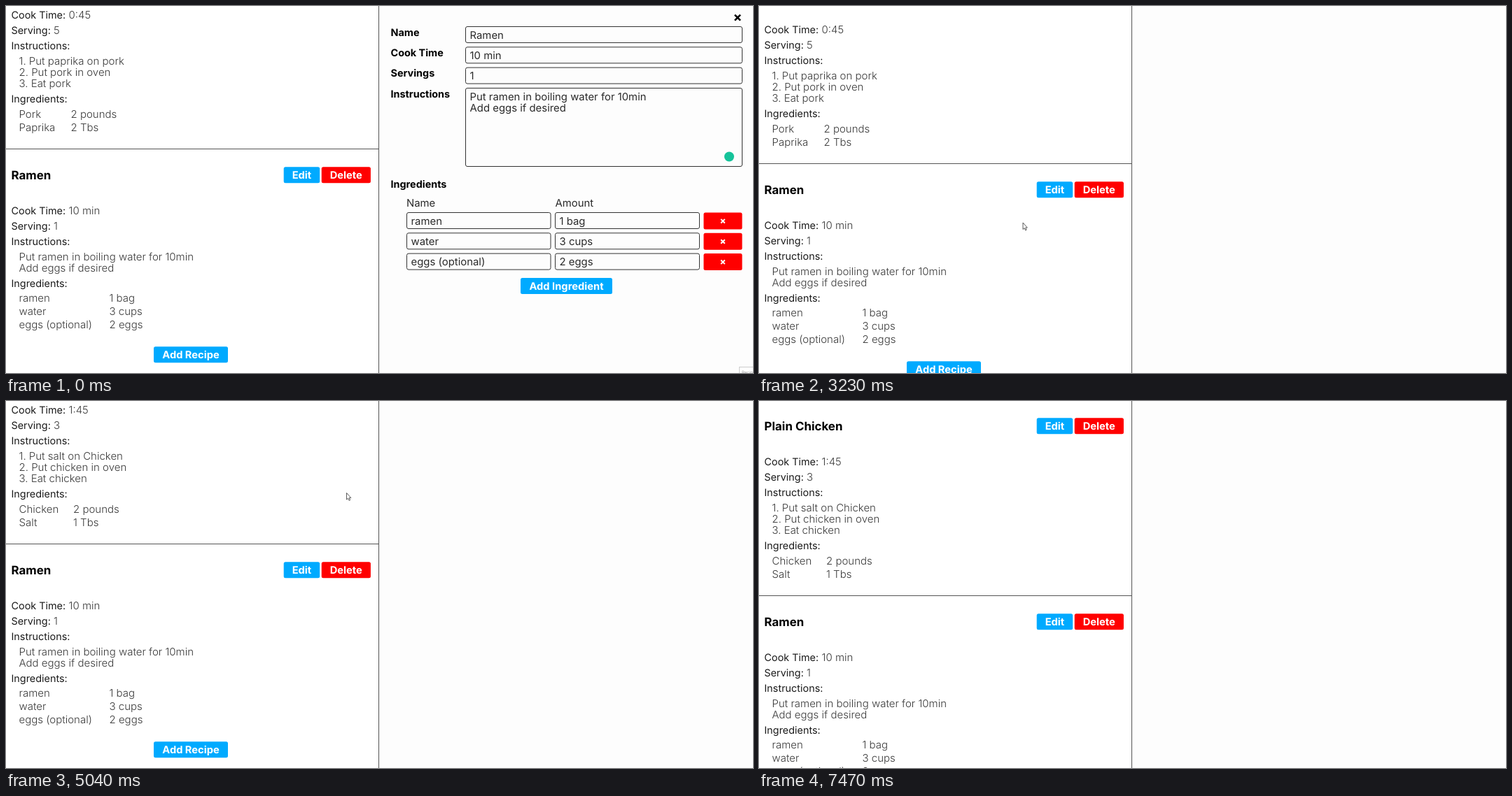
Animation of 1067 by 525 pixels, one loop 8 s. Source, as an HTML page:

```html
<!DOCTYPE html>
<html lang="en">
<head>
<meta charset="utf-8">
<title>Recipe list</title>
<style>
  html, body { margin: 0; width: 100%; height: 100%; overflow: hidden; background: #fff; }
  svg { display: block; width: 100vw; height: 100vh; cursor: default; user-select: none; }
  text { font-family: Inter, "Open Sans", sans-serif; font-size: 14.4px; fill: #1a1a1a; text-rendering: geometricPrecision; }
  .value { font-size: 15px; font-weight: 300; fill: #3a3a3a; }
  .entry { font-size: 14.9px; fill: #2a2a2a; }
  .title { font-size: 16.9px; font-weight: 700; fill: #000; }
  .label { font-size: 14.4px; font-weight: 700; fill: #000; }
  .btn text { font-size: 14.7px; font-weight: 700; fill: #fff; text-anchor: middle; }
  .tip { font-size: 6px; fill: #999; }
  .blue { fill: #0af; }
  .red { fill: #f00; }
  .hot .blue { fill: #0088cc; }
  .hot .red { fill: #c00; }
  .pane { fill: #fdfdfd; }
  .field { fill: #fdfdfd; stroke: #333; }
  .rule { stroke: #555; }
  #cursor { pointer-events: none; }
</style>
</head>
<body>
<svg id="stage" viewBox="0 0 1067 525" preserveAspectRatio="none">
  <g id="list"></g>
  <rect class="pane" x="533" y="0" width="534" height="525"/>
  <path class="rule" d="M532.5 0V525"/>
  <g id="form"></g>
  <g id="tooltip">
    <rect x="1047.5" y="516.5" width="24" height="14" fill="#fff" stroke="#ccc"/>
    <text class="tip" x="1051" y="525.5">Recipe</text>
  </g>
  <g id="cursor">
    <path id="arrow" d="M.5 .5V10L2.6 8.2L4.1 11.4L5.6 10.7L4.2 7.6H6.8Z" fill="#fff" stroke="#333" stroke-width=".8"/>
    <path id="beam" d="M-2 -4.5H-.5L0 -4L.5 -4.5H2M0 -4V4M-2 4.5H-.5L0 4L.5 4.5H2" fill="none" stroke="#555" stroke-width=".8"/>
    <path id="hand" d="M-1 0Q0 -1 1 0V4L4.5 5Q5.5 5.5 5.2 7L4.3 11H-1.2L-4 7Q-4 5.6 -2.6 6.2L-1 7.5Z" fill="#fff" stroke="#333" stroke-width=".8"/>
  </g>
</svg>
<script>
const LOOP = 8000, FORM_CLOSED = 2130, PORK_DELETED = 4970, RECIPE_HEIGHT = 280;
const $ = id => document.getElementById(id);

const text = (cls, x, y, s) => `<text class="${cls}" x="${x}" y="${y}">${s}</text>`;
const rect = (cls, x, y, w, h) =>
  `<rect class="${cls}" x="${x}" y="${y}" width="${w}" height="${h}" rx="2.5"/>`;
const cross = (x, y, r, color, width) =>
  `<path d="M${x - r} ${y - r}l${2 * r} ${2 * r}m0 ${-2 * r}l${-2 * r} ${2 * r}" stroke="${color}" stroke-width="${width}"/>`;
const button = (cls, x, y, w, s) =>
  `<g class="btn">${rect(cls, x, y, w, 23)}<text x="${x + w / 2}" y="${y + 16.7}">${s}</text></g>`;
const field = (x, y, w, s, h = 23) =>
  rect("field", x + .5, y, w - 1, h) + text("entry", x + 6.5, y + 17, s);

// Everything is placed relative to the rule above the recipe.
function recipe(id, name, time, serving, steps, amountX, items) {
  const listY = 159, itemsY = listY + steps.length * 16.4 + 5.5;
  return `<g id="${id}"><path class="rule" d="M0 0H532"/>` +
    text("title", 7.5, 43.6, name) +
    button("blue", 396.7, 25.8, 51.5, "Edit") + button("red", 450.7, 25.8, 70.2, "Delete") +
    text("", 7.5, 93.7, "Cook Time:") + text("value", 89.5, 93.7, time) +
    text("", 7.5, 115.7, "Serving:") + text("value", 68, 115.7, serving) +
    text("", 7.5, 137.5, "Instructions:") +
    steps.map((s, i) => text("value", 18.5, listY + i * 16.4, s)).join("") +
    text("", 7.5, itemsY, "Ingredients:") +
    items.map(([item, amount], i) => {
      const y = itemsY + 21.3 + i * 19.1;
      return text("value", 18.5, y, item) + text("value", amountX, y, amount);
    }).join("") + `</g>`;
}

const noodles = [["ramen", "1 bag"], ["water", "3 cups"], ["eggs (optional)", "2 eggs"]];
const method = ["Put ramen in boiling water for 10min", "Add eggs if desired"];

$("list").innerHTML =
  recipe("chicken", "Plain Chicken", "1:45", 3,
    ["1. Put salt on Chicken", "2. Put chicken in oven", "3. Eat chicken"],
    96, [["Chicken", "2 pounds"], ["Salt", "1 Tbs"]]) +
  recipe("pork", "Plain Pork", "0:45", 5,
    ["1. Put paprika on pork", "2. Put pork in oven", "3. Eat pork"],
    92.5, [["Pork", "2 pounds"], ["Paprika", "2 Tbs"]]) +
  recipe("ramen", "Ramen", "10 min", 1, method, 147.5, noodles) +
  `<g id="add">${button("blue", 211, 282.7, 106, "Add Recipe")}</g>`;

$("form").innerHTML =
  `<g class="btn"><rect class="pane" x="1038" y="9" width="14" height="15"/>${cross(1045, 16.7, 4, "#000", 2.6)}</g>` +
  [["Name", "Ramen"], ["Cook Time", "10 min"], ["Servings", "1"]].map(([name, value], i) =>
    text("label", 549.5, 42.6 + i * 29.3, name) + field(656, 29.5 + i * 29.3, 396, value)).join("") +
  text("label", 549.5, 130.6, "Instructions") +
  field(656, 117.5, 396, method[0], 112) + text("entry", 662.5, 151.4, method[1]) +
  `<circle cx="1033" cy="215.5" r="7" fill="#15c39a"/>` +
  text("label", 549.5, 259.6, "Ingredients") +
  text("entry", 572, 287.3, "Name") + text("entry", 784.5, 287.3, "Amount") +
  noodles.map(([item, amount], i) => {
    const y = 295.5 + i * 29.3;
    return field(572, y, 206.5, item) + field(784, y, 207, amount) +
      `<g class="btn">${rect("red", 996.5, y, 55, 24)}${cross(1024, y + 12.2, 2.8, "#fff", 2)}</g>`;
  }).join("") +
  button("blue", 735, 389, 131, "Add Ingredient");

const smooth = p => p * p * (3 - 2 * p);
const glide = p => .2 * p + .8 * smooth(p);

// Progress of a scroll drawn in n steps, the first at a and the last at b.
function stepped(t, a, b, n) {
  if (t < a) return 0;
  const k = Math.floor((t - a) / (b - a) * (n - 1) + 1e-6) + 1;
  return glide(Math.min(k, n) / n);
}

// Scrolling lands on whole pixels, which keeps the rules sharp.
function ramenY(t) {
  const scrolled = t < PORK_DELETED
    ? 169 * stepped(t, 3230, 3500, 5)
    : 74 * stepped(t, 5990, 6200, 4);
  return 204.5 + Math.round(scrolled);
}

// Pointer path: time, x, y
const path = [
  [450, 1004, 503], [550, 1017, 508], [850, 1036, 455], [1200, 822, 230],
  [1590, 1024, 31], [1800, 1043, 17], [2300, 1043, 17], [2440, 1039, 18],
  [2960, 376.5, 309.5], [3780, 376.5, 309.5], [3970, 495, 191], [4200, 486, 131],
  [5380, 486, 131], [5860, 333, 406], [6560, 333, 406], [6660, 388, 395],
  [6810, 388, 395], [6900, 395, 360], [7400, 9, 6]
];

function pointer(t) {
  const i = path.findIndex(k => k[0] > t);
  if (i < 1) return path[i < 0 ? path.length - 1 : 0].slice(1);
  const [t0, x0, y0] = path[i - 1], [t1, x1, y1] = path[i];
  const p = smooth((t - t0) / (t1 - t0));
  return [x0 + (x1 - x0) * p, y0 + (y1 - y0) * p];
}

const show = (id, on) => $(id).setAttribute("display", on ? "inline" : "none");
const move = (id, x, y) => $(id).setAttribute("transform", `translate(${x} ${y})`);
let hot = null;

function drawCursor(t) {
  const visible = (t >= 450 && t < 650) || (t >= 850 && t < 7470);
  show("cursor", visible);
  if (hot) hot.classList.remove("hot");
  hot = null;
  if (!visible) return;
  const [x, y] = pointer(t);
  move("cursor", x, y);
  const under = document.elementFromPoint(x, y);
  hot = under && under.closest(".btn");
  if (hot) hot.classList.add("hot");
  const typing = !hot && under && under.matches("text, .field");
  show("hand", hot);
  show("beam", typing);
  show("arrow", !hot && !typing);
}

function draw(t) {
  const y = ramenY(t), deleted = t >= PORK_DELETED;
  move("ramen", 0, y);
  move("add", 0, y);
  move("pork", 0, y - RECIPE_HEIGHT);
  move("chicken", 0, y - RECIPE_HEIGHT * (deleted ? 1 : 2));
  show("pork", !deleted);
  show("form", t < FORM_CLOSED);
  show("tooltip", t < 70);
  drawCursor(t);
}

const start = performance.now();
function tick() {
  draw((performance.now() - start) % LOOP);
  requestAnimationFrame(tick);
}
tick();
</script>
</body>
</html>
```
